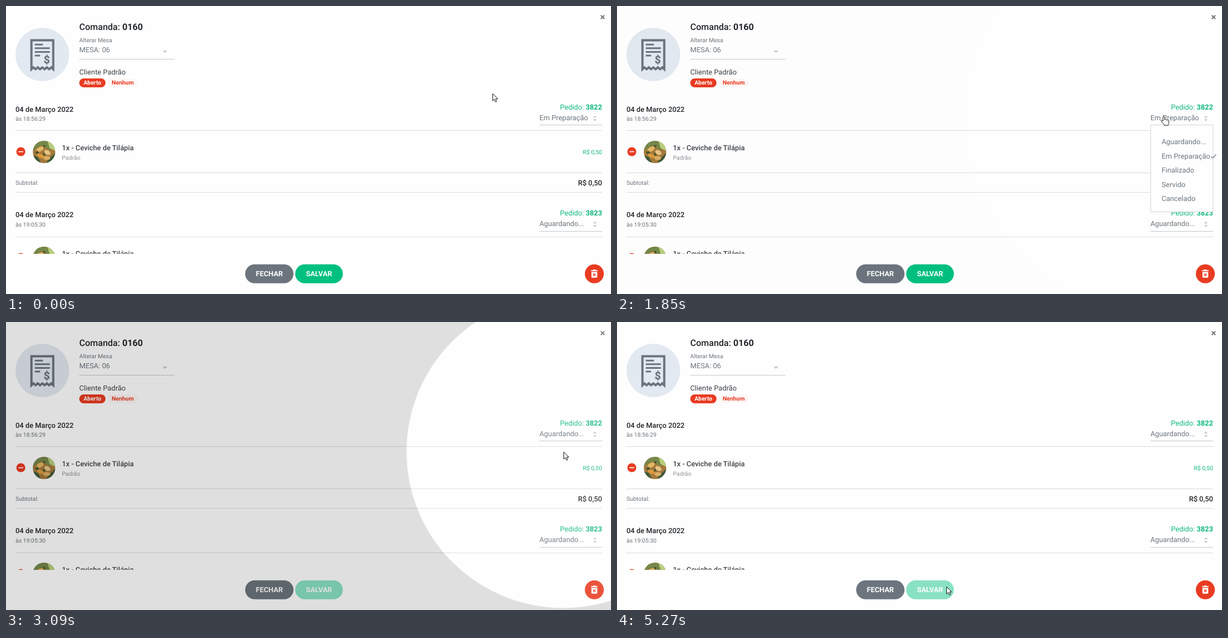
These frames come from a looping animation (1082x517 px, 5320 ms). An HTML page:

```html
<!DOCTYPE html>
<html lang="pt-BR">
<head>
<meta charset="utf-8">
<title>Comanda</title>
<style>
  html, body { margin: 0; width: 100%; height: 100%; overflow: hidden; background: #fefefe; }
  main { position: relative; width: 100%; height: 100%; overflow: hidden; contain: strict; }
  svg { display: block; position: absolute; left: 0; top: 0; }

  text { font: 400 12.8px Roboto, sans-serif; fill: #6c757d; text-rendering: geometricPrecision; }
  .dark { fill: #3d4248; }
  .strong { fill: #212529; }
  .strong, .medium { font-weight: 500; }
  .title { font-size: 16px; }
  .small { font-size: 10.4px; }
  .pale { fill: #8f959b; }
  .green { fill: #0fb97d; }
  .bold { font-weight: 700; }
  .money { font-size: 19px; stroke: #6c757d; stroke-width: .4; }
  .end { text-anchor: end; }
  .mid { text-anchor: middle; }
  .white { fill: #fff; }
  .red { fill: #e93c22; }
  .rule { stroke: #d9dbdd; }
  .field { stroke: #c4c7ca; }
  .arrow { fill: #c6c8ca; }

  .open, .before, .after, .save, .hand, .tip, .gate, .click, .spot, .pointer {
    animation: 5320ms step-end infinite;
  }
  .open { animation-name: open; }
  .before { animation-name: before; }
  .after { animation-name: after; }
  .save { animation-name: save; }
  .hand { animation-name: hand; }
  .tip { animation-name: tip; }
  .gate { animation-name: gate; }
  .click { animation-name: click; animation-timing-function: linear; }
  .pointer {
    position: absolute; left: 0; top: 0;
    animation-name: move; animation-timing-function: ease-in-out;
  }
  .pointer svg { overflow: visible; }
  .spot {
    position: absolute; border-radius: 50%; background: #fff;
    box-shadow: 0 0 0 1500px #000; transform: translate(-50%, -50%);
    animation-name: spot; animation-timing-function: cubic-bezier(.333, 1, .667, 1);
  }

  @keyframes open {
    0%, 55.64%, 100% { visibility: hidden; }
    29.7% { visibility: visible; }
  }
  @keyframes before { 0% { visibility: visible; } 55.64%, 100% { visibility: hidden; } }
  @keyframes after { 0% { visibility: hidden; } 55.64%, 100% { visibility: visible; } }
  @keyframes save { 0% { opacity: 1; } 55.64%, 100% { opacity: .46; } }
  @keyframes hand {
    0%, 55.64%, 100% { visibility: hidden; }
    26.7% { visibility: visible; }
  }
  @keyframes tip {
    0%, 55.64%, 100% { visibility: visible; }
    26.7% { visibility: hidden; }
  }
  @keyframes gate {
    0%, 41.92%, 71.8% { visibility: visible; }
    37.12%, 64%, 99.06%, 100% { visibility: hidden; }
  }
  @keyframes spot {
    0%, 13.55%, 37.12%, 39.79%, 64%, 70.86%, 99.06%, 100% { width: 720px; height: 720px; opacity: 0; }
    22.95%, 27.73%, 49.19%, 54.61%, 80.26%, 89.66% { width: 80px; height: 80px; opacity: .5; }
  }
  @keyframes click {
    0%, 27.5%, 30.1%, 54.5%, 56.2%, 89.5%, 91.4%, 100% { opacity: 0; }
    27.6%, 28.8%, 54.6%, 55.3%, 89.6%, 90.4% { opacity: .85; }
  }
  @keyframes move {
    0%, 22.95% { transform: translate(870px, 157px); }
    27.35%, 49.44% { transform: translate(976px, 198px); }
    54.23%, 80.26% { transform: translate(997px, 233px); }
    89.1%, 100% { transform: translate(589px, 475px); }
  }
</style>
</head>
<body>
<main>
<svg width="1082" height="517" viewBox="0 0 1082 517">
  <defs>
    <clipPath id="list"><rect width="1082" height="445"/></clipPath>
    <clipPath id="plate"><circle cx="68" cy="262" r="20"/></clipPath>
    <g id="sort" class="arrow">
      <path d="M1049.8 200.3l3.3-3.6 3.3 3.6zM1049.8 203.2l3.3 3.6 3.3-3.6z"/>
    </g>
    <g id="item">
      <circle cx="26.5" cy="261.5" r="8" class="red"/>
      <rect x="22.3" y="260.7" width="8.4" height="1.7" fill="#fff"/>
      <g clip-path="url(#plate)">
        <rect x="48" y="242" width="40" height="40" fill="#a5793c"/>
        <path d="M48 242h40v13l-12 3-10-8-10 4-8 6z" fill="#75884a"/>
        <path d="M74 242h14v18l-10-5z" fill="#b9cf7d"/>
        <path d="M48 268l9 3 6 11H48zM75 276l13-12v18H72z" fill="#3f5a3a"/>
        <ellipse cx="61" cy="257" rx="7" ry="4" fill="#e2b765" transform="rotate(-28 61 257)"/>
        <ellipse cx="74" cy="263" rx="6" ry="4" fill="#e6c384" transform="rotate(30 74 263)"/>
        <ellipse cx="62" cy="269" rx="7" ry="3.5" fill="#d99a3e" transform="rotate(20 62 269)"/>
        <ellipse cx="73" cy="273" rx="6" ry="3.5" fill="#dcae63"/>
        <path d="M52 262l5-2 2 4-5 2zM67 262l4 5-5 2zM66 249l5 2-3 4z" fill="#44552f"/>
      </g>
      <text x="100" y="258.5" class="dark medium">1x - Ceviche de Tilápia</text>
    </g>
  </defs>

  <!-- header -->
  <circle cx="65" cy="87" r="48" fill="#e2e9f0"/>
  <g fill="none" stroke="#6a737d" stroke-width="4">
    <path d="M45.5 113.5V61.5H84.5V113.5L81 110.2 77.1 113.5 73.1 110.2 69.1 113.5 65 110.2 60.9 113.5 56.9 110.2 52.9 113.5 49 110.2Z"/>
    <path stroke-width="3" d="M51.5 69.2H66M51.5 75.8H78.5M51.5 82.4H78.5M51.5 89H61"/>
  </g>
  <text x="73" y="103" class="mid bold money">$</text>
  <text x="131" y="43" class="strong title">Comanda: <tspan class="bold">0160</tspan></text>
  <text x="131" y="65" class="small">Alterar Mesa</text>
  <text x="131" y="83.2">MESA: 06</text>
  <path d="M280 80h8.4l-4.2 4.2z" class="arrow"/>
  <path d="M131 95.5H301" class="field"/>
  <text x="131" y="123" class="dark">Cliente Padrão</text>
  <rect x="131" y="130" width="47" height="16" rx="8" class="red"/>
  <text x="154.5" y="141.4" class="small bold mid white">Aberto</text>
  <rect x="181" y="130" width="55" height="16" rx="8" fill="#fdf8f7"/>
  <text x="208.7" y="141.4" class="small bold mid red">Nenhum</text>
  <path d="M1063.7 16.7l6.6 6.6m0-6.6l-6.6 6.6" stroke="#74777a" stroke-width="2"/>

  <!-- first order -->
  <text x="17" y="189.5" class="strong">04 de Março 2022</text>
  <text x="17" y="206" class="small">às 18:56:29</text>
  <text x="1066" y="186.3" class="green end">Pedido: <tspan class="bold">3822</tspan></text>
  <text x="954" y="205.4" class="before">Em Preparação</text>
  <text x="954" y="205.4" class="after">Aguardando...</text>
  <use href="#sort"/>
  <path d="M954 213.5H1066" class="field"/>
  <path d="M17 223.5H1066M17 299.5H1066M17 334.5H1066" class="rule"/>
  <use href="#item"/>
  <text x="100" y="276.2" class="small pale">Padrão</text>
  <text x="1066" y="266" class="small green end">R$ 0,50</text>
  <text x="17" y="321" class="small">Subtotal:</text>
  <text x="1066" y="321.7" class="strong end">R$ 0,50</text>

  <!-- second order -->
  <text x="17" y="379" class="strong">04 de Março 2022</text>
  <text x="17" y="395.5" class="small">às 19:05:30</text>
  <text x="1066" y="375.8" class="green end">Pedido: <tspan class="bold">3823</tspan></text>
  <text x="954" y="395">Aguardando...</text>
  <use href="#sort" y="190"/>
  <path d="M954 404.5H1066" class="field"/>
  <path d="M17 414.5H1066" class="rule"/>
  <g clip-path="url(#list)"><use href="#item" y="190"/></g>

  <!-- footer -->
  <rect x="427.7" y="463.7" width="86.5" height="34" rx="17" fill="#6c757d"/>
  <text x="471" y="485" class="bold mid white">FECHAR</text>
  <g class="save">
    <rect x="517.2" y="463.7" width="85.3" height="34" rx="17" fill="#00c07f"/>
    <text x="559.8" y="485" class="bold mid white">SALVAR</text>
  </g>
  <circle cx="1052.2" cy="480.8" r="17" class="red"/>
  <path d="M1046.3 474.2h3l1-1.2h3.8l1 1.2h3v1.8h-11.8zM1047 477.2h10.4v9q0 1.6-1.6 1.6h-7.2q-1.6 0-1.6-1.6z" fill="#fff"/>
  <path d="M1050 480.2l4.4 4.4m0-4.4l-4.4 4.4" stroke="#e93c22" stroke-width="1.4"/>

  <!-- status list -->
  <g class="open">
    <rect x="954.5" y="213.5" width="111.5" height="156" fill="#fefefe" stroke="#d2d4d6"/>
    <text x="974" y="248">Aguardando...</text>
    <text x="974" y="273.6">Em Preparação</text>
    <text x="974" y="299.2">Finalizado</text>
    <text x="974" y="324.8">Servido</text>
    <text x="974" y="350.4">Cancelado</text>
    <path d="M1062.5 270l3 3 6-6.5" fill="none" stroke="#6c757d" stroke-width="1.2"/>
  </g>
</svg>

<div class="pointer">
  <div class="gate"><div class="spot"></div></div>
  <svg width="1" height="1">
    <circle r="10" fill="#fbee2e" class="click"/>
    <g fill="#fff" stroke="#111" stroke-width="1" stroke-linejoin="round">
      <path class="tip" d="M.5.5V13.2L3.4 10.5 5.4 15.2 7.6 14.2 5.6 9.7H9.6Z"/>
      <path class="hand" d="M.5 1.8a1.5 1.5 0 0 1 3 0V6.3c.5-.8 2.3-.8 2.7.3.6-.7 2.1-.5 2.5.6.8-.6 2.3-.2 2.3 1.1V11c0 2-1 2.8-1.2 5.2H2.8C2.4 13.7 0 12.2-2.6 9c-1-1.5.5-2.6 1.7-1.5L.5 8.7Z"/>
    </g>
  </svg>
</div>
</main>
</body>
</html>
```
